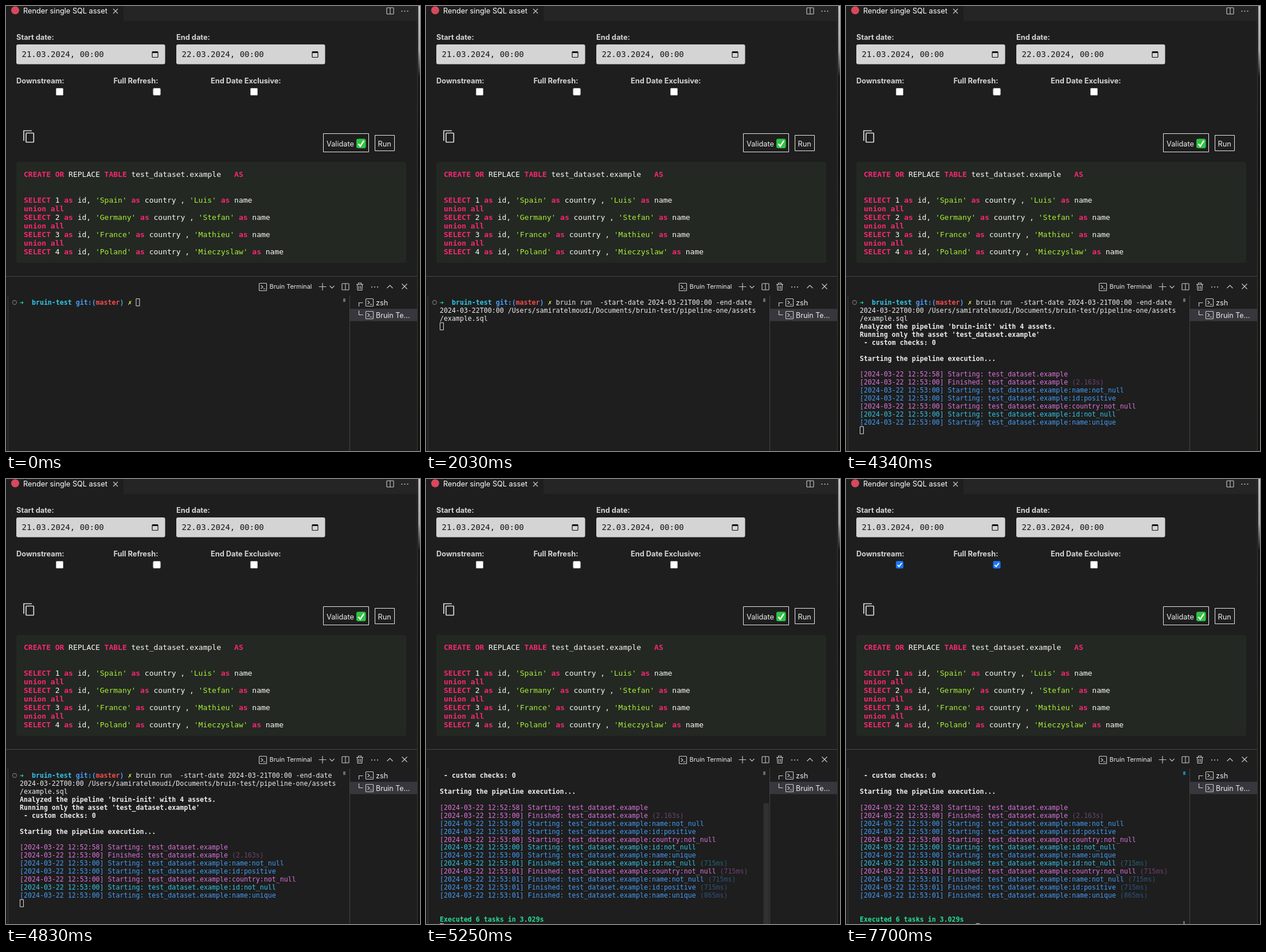
Write an HTML page with a canvas that moves like this. It is 722 by 776 pixels and loops after 8 s.

```html
<!DOCTYPE html>
<html lang="en">
<head>
<meta charset="utf-8">
<title>Render single SQL asset</title>
<style>
  html, body { margin: 0; width: 722px; height: 776px; overflow: hidden; background: #1e1e1e; }
  canvas { display: block; }
</style>
</head>
<body>
<canvas id="stage" width="722" height="776"></canvas>
<script>
const ctx = document.getElementById('stage').getContext('2d');
const LOOP = 8000;
const UI = 'Inter, sans-serif';
const MONO = '"DejaVu Sans Mono", monospace';
const FG = '#ececec', ICON = '#cccccc', PINK = '#f92672', LIME = '#a9ee36';
const MAGENTA = '#dc74dc', BLUE = '#459cf5', CYAN = '#33c4e6', GREEN = '#26dc95';

// Drawing helpers
function text(str, x, y, font, color = FG) {
  ctx.font = font;
  ctx.fillStyle = color;
  ctx.fillText(str, x, y);
}
function rect(x, y, w, h, color, radius = 0) {
  ctx.fillStyle = color;
  ctx.beginPath();
  ctx.roundRect(x, y, w, h, radius);
  ctx.fill();
}
function frame(x, y, w, h, color, width = 1, radius = 0) {
  ctx.strokeStyle = color;
  ctx.lineWidth = width;
  ctx.beginPath();
  ctx.roundRect(x, y, w, h, radius);
  ctx.stroke();
}
function path(d, color = ICON, width = 1.1) {
  ctx.strokeStyle = color;
  ctx.lineWidth = width;
  ctx.stroke(new Path2D(d));
}
function disc(x, y, r, color) {
  ctx.fillStyle = color;
  ctx.beginPath();
  ctx.arc(x, y, r, 0, 7);
  ctx.fill();
}

// Icons
const cross = (x, y, r) => path(`M${x - r} ${y - r}l${2 * r} ${2 * r}m0 ${-2 * r}l${-2 * r} ${2 * r}`);
const dots = (x, y) => [-5, 0, 5].forEach(dx => disc(x + dx, y, 1, ICON));
function splitIcon(x, y) {
  frame(x, y, 12, 11, ICON, 1.1, 1);
  path(`M${x + 6} ${y}v11`);
}
function terminalIcon(x, y) {
  frame(x, y, 13, 13, ICON, 1.1, 1);
  path(`M${x + 3} ${y + 3.5}l3.5 3l-3.5 3M${x + 7} ${y + 9.8}h4`);
}
function calendarIcon(x, y) {
  frame(x, y, 10, 9.5, '#111', 1.2, 1);
  rect(x, y - 1, 10, 3, '#111');
}

// Upper view
function drawHeader() {
  rect(205, 0, 512, 26, '#252526');
  disc(16, 7.5, 7, '#d8485c');
  text('Render single SQL asset', 30, 13, `12.75px ${UI}`, '#fff');
  cross(191, 9, 4);
  splitIcon(664, 3);
  dots(695.5, 9);
}

const label = (str, x, y) => text(str, x, y, `bold 12.8px ${UI}`, '#d4d4d4');

function dateField(title, date, x) {
  label(title, x, 59);
  rect(x, 67, 259.5, 34.5, '#d4d4d4', 3);
  text(date, x + 9.5, 89, `14px ${MONO}`, '#161616');
  calendarIcon(x + 237, 80);
}

function checkbox(x, state) {
  const fill = { off: '#fff', hover: '#f2f2f2', pressed: '#dcdcdc', active: '#0b66dd', on: '#1a75ff' }[state];
  const checked = state === 'on' || state === 'active';
  rect(x, 143, 13, 13, fill, 2.5);
  if (checked) path(`M${x + 2.8} 149.8l2.6 2.8l4.8 -6`, '#fff', 1.9);
  else frame(x + .5, 143.5, 12, 12, '#b4b4b4', 1, 2);
}

function drawForm(t) {
  dateField('Start date:', '21.03.2024, 00:00', 18);
  dateField('End date:', '22.03.2024, 00:00', 297);
  label('Downstream:', 18, 135);
  label('Full Refresh:', 187.5, 135);
  label('End Date Exclusive:', 357, 135);
  checkbox(87, at(t, [[0, 'off'], [6090, 'hover'], [6370, 'pressed'], [6440, 'active'], [7700, 'on']]));
  checkbox(256.5, at(t, [[0, 'off'], [5670, 'hover'], [5740, 'pressed'], [5810, 'active'], [6090, 'on']]));
  checkbox(426, 'off');
}

function drawActions(t) {
  path('M31 235V217.5H45', '#dcdcdc', 1.7);
  frame(35, 221.5, 13.3, 16, '#dcdcdc', 1.7, 1);
  frame(553.5, 222.5, 79, 32, '#e8e8e8');
  text('Validate', 559, 244.5, `12.75px ${UI}`);
  rect(611, 231.5, 16.5, 16.5, '#2fc443', 3);
  path('M614.5 240.5l3.3 4l6.3 -9.5', '#fff', 2.3);

  const hover = at(t, [[0, 0], [840, .5], [910, 1], [2030, 0]]);
  rect(643, 225, 35, 28, `rgba(212,212,212,${hover})`);
  frame(643.5, 225.5, 34, 27, hover === 1 ? '#d4d4d4' : '#e8e8e8');
  text('Run', 648.5, 244.5, `12.75px ${UI}`, hover ? '#333' : FG);
}

const person = (id, country, name) => `SELECT ${id} as id, '${country}' as country , '${name}' as name`;
const SQL = [
  'CREATE OR REPLACE TABLE test_dataset.example   AS', '', '',
  person(1, 'Spain', 'Luis'), 'union all',
  person(2, 'Germany', 'Stefan'), 'union all',
  person(3, 'France', 'Mathieu'), 'union all',
  person(4, 'Poland', 'Mieczyslaw'),
];

function drawCode() {
  rect(18, 272, 680, 176, '#232823', 4);
  SQL.forEach((line, row) => {
    for (const m of line.matchAll(/'\w+'|[\w.]+|,/g)) {
      const keyword = /^(CREATE|OR|TABLE|AS|SELECT|union|all|as)$/.test(m[0]);
      const color = keyword ? PINK : m[0][0] === "'" ? LIME : '#fafaf6';
      text(m[0], 31 + m.index * 7.81, 297.5 + row * 15, `${keyword ? 'bold ' : ''}13px ${MONO}`, color);
    }
  });
}

// Terminal: each line is a list of [column, text, color, bold, alpha]
const CELL = 6.98, ROW = 13.94, VISIBLE = 19;
const prompt = [
  [0, '➜', GREEN, 1], [3, 'bruin-test', CYAN, 1], [14, 'git:(', BLUE, 1],
  [19, 'master', '#f14c4c', 1], [25, ')', BLUE, 1], [27, '✗', '#f5f543', 1],
];
const plain = str => [[0, str, FG]];
const strong = (str, color = FG) => [[0, str, color, 1]];
function task(time, verb, check, color, duration = '') {
  const str = `[2024-03-22 12:${time}] ${verb}: test_dataset.example${check}`;
  return [[0, str, color], [str.length + 1, duration, color, 0, .42]];
}
const start = (check, color) => task('53:00', 'Starting', check, color);
const finish = (check, color, ms) => task('53:01', 'Finished', check, color, `(${ms}ms)`);

const LOG = [
  [...prompt, [29, 'bruin run  -start-date 2024-03-21T00:00 -end-date', FG]],
  plain('2024-03-22T00:00 /Users/samiratelmoudi/Documents/bruin-test/pipeline-one/assets'),
  plain('/example.sql'),
  strong("Analyzed the pipeline 'bruin-init' with 4 assets."),
  strong("Running only the asset 'test_dataset.example'"),
  strong(' - custom checks: 0'),
  [],
  strong('Starting the pipeline execution...'),
  [],
  task('52:58', 'Starting', '', MAGENTA),
  task('53:00', 'Finished', '', MAGENTA, '(2.163s)'),
  start(':name:not_null', BLUE),
  start(':id:positive', BLUE),
  start(':country:not_null', MAGENTA),
  start(':id:not_null', CYAN),
  start(':name:unique', BLUE),
  finish(':id:not_null', CYAN, 715),
  finish(':country:not_null', MAGENTA, 715),
  finish(':name:not_null', BLUE, 715),
  finish(':id:positive', BLUE, 715),
  finish(':name:unique', BLUE, 865),
  [], [],
  strong('Executed 6 tasks in 3.029s', GREEN),
];

function drawLog(t) {
  const count = at(t, [[0, 0], [2030, 3], [2170, 9], [2240, 10], [4340, 16], [5110, 20], [5180, 21], [5250, 24]]);
  const done = t >= 5320;
  const scroll = Math.max(0, count - VISIBLE);
  const lines = count ? LOG.slice(0, count) : [prompt];
  if (done) lines.push(prompt);

  ctx.save();
  ctx.beginPath();
  ctx.rect(4, 506, 595, 270);
  ctx.clip();
  lines.forEach((line, i) => {
    const y = 517 + (i - scroll) * ROW;
    if (y < 512) return;
    for (const [col, str, color, bold, alpha = 1] of line) {
      ctx.globalAlpha = alpha;
      text(str, 24 + col * CELL, y + 4, `${bold ? 'bold ' : ''}11.6px ${MONO}`, color);
    }
    ctx.globalAlpha = 1;
  });
  if (!scroll) frame(11.5, 513.5, 7, 7, '#6c6c6c', 1.3, 3.5);
  const cursorCol = !count || done ? 29 : 0;
  frame(24.5 + cursorCol * CELL, 510.5 + (count - scroll) * ROW, 6, 12.5, '#dedede');
  ctx.restore();

  if (scroll && t < 5390) {
    const top = 510 + 266 * scroll / count;
    rect(588.5, top, 9.5, 776 - top, '#313131');
  }
  rect(588, 510, 4, 6, done ? '#1a80b4' : '#6a6a6a');
  if (done) rect(588, 771, 3, 5, '#6a6a6a');
}

function drawPanel() {
  rect(0, 471, 717, 1, '#464646');
  rect(3, 505, 1, 271, '#3c3c3c');
  rect(599, 505, 1, 271, '#444');

  terminalIcon(441.5, 483.5);
  text('Bruin Terminal', 459.5, 493, `10.9px ${UI}`);
  path('M545.5 489.5h13M552 483v13');
  path('M564.5 488l4 4l4 -4');
  splitIcon(586, 484);
  path('M611 485.5h12M614.5 485v-2h5v2M612.5 486l.7 9.5h7.6l.7 -9.5M615.5 488v5.5M618.5 488v5.5');
  dots(643, 490);
  path('M664.5 492l5 -5l5 5');
  cross(695, 489, 4.5);

  rect(600, 528, 117, 21.5, '#37373d');
  path('M615.5 524v-6.5h7M615.5 531v7.5h7', '#d0d0d0');
  terminalIcon(627.5, 510.5);
  terminalIcon(627.5, 532.5);
  text('zsh', 645, 521.5, `12.75px ${UI}`);
  text('Bruin Te...', 645, 543.5, `12.5px ${UI}`);
}

function drawEdge() {
  const shade = ctx.createLinearGradient(0, 0, 0, 776);
  shade.addColorStop(0, '#c4c4c4');
  shade.addColorStop(.1, '#a8a8a8');
  shade.addColorStop(.16, '#1c1c1e');
  shade.addColorStop(.35, '#121214');
  shade.addColorStop(.5, '#1d1a10');
  shade.addColorStop(1, '#14130d');
  rect(717, 0, 1, 776, '#3a3a3a');
  rect(718, 0, 1, 776, '#141414');
  rect(719, 0, 3, 776, shade);
}

// Value of the last [time, value] step reached
const at = (t, steps) => steps.findLast(([time]) => t >= time)[1];

function draw(now) {
  const t = now % LOOP;
  rect(0, 0, 722, 776, '#1e1e1e');
  drawHeader();
  drawForm(t);
  drawActions(t);
  drawCode();
  drawPanel();
  drawLog(t);
  drawEdge();
}

const origin = performance.now();
function tick() {
  draw(performance.now() - origin);
  requestAnimationFrame(tick);
}
tick();
</script>
</body>
</html>
```
